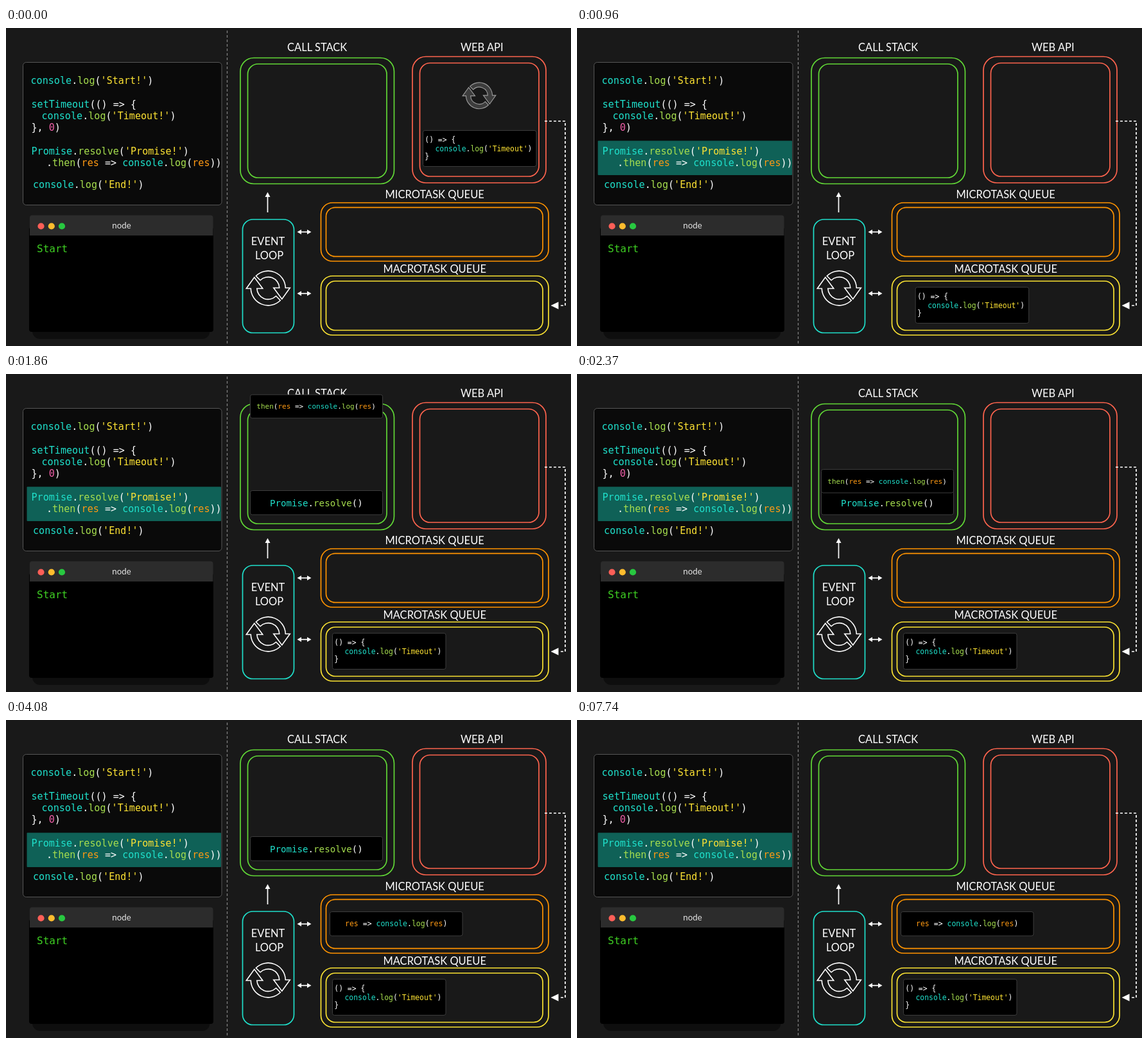
An HTML page for the animation above (7770 ms loop, 880x495 px).

```html
<!DOCTYPE html>
<html lang="en">
<head>
<meta charset="utf-8">
<title>Event loop</title>
<style>
  html, body { margin: 0; width: 100%; height: 100%; overflow: hidden; background: #191919; }
  svg { display: block; width: 880px; height: 495px; }
  .code { font-family: "DejaVu Sans Mono", Menlo, monospace; white-space: pre; fill: #fff; }
  .label { font-family: Lato, Avenir, sans-serif; font-size: 16.5px; fill: #fff; text-anchor: middle; }
  .frame { fill: none; stroke-width: 1.7; }
  .card rect { fill: #000; stroke: #3c3c3c; }
  .line { fill: none; stroke: #fff; stroke-width: 1.7; }
  .head { fill: #fff; }
</style>
</head>
<body>
<svg id="stage" viewBox="0 0 880 495">
  <defs>
    <path id="half" d="M-19 -19 A27 27 0 0 1 27 -.5 H34 L21.5 17 L8.5 -.5 H17.5 A17.5 17.5 0 0 0 -12.3 -12.3 Z"/>
    <g id="cycle"><use href="#half"/><use href="#half" transform="rotate(180)"/></g>
    <g id="both">
      <path class="line" d="M458 0H471"/>
      <path class="head" d="M453.5 0l6.5-3.7v7.4zM475.5 0l-6.5-3.7v7.4z"/>
    </g>
  </defs>
</svg>
<script>
const LOOP = 7770, STEP = 30;
const TEAL = '#1fe0cb', GREEN = '#a6de4e', YELLOW = '#fee333', ORANGE = '#ff9a13', PINK = '#ef5fa7';
const stage = document.getElementById('stage');

function add(tag, attrs, parent = stage, text) {
  const el = document.createElementNS('http://www.w3.org/2000/svg', tag);
  for (const key in attrs) el.setAttribute(key, attrs[key]);
  if (text) el.textContent = text;
  parent.append(el);
  return el;
}

const box = (x, y, right, bottom, rx, attrs, parent) =>
  add('rect', { x, y, width: right - x, height: bottom - y, rx, ...attrs }, parent);

function colorOf(token) {
  if (token[0] === "'") return YELLOW;
  if (/^(console|Promise|setTimeout)$/.test(token)) return TEAL;
  if (/^(log|resolve|then)$/.test(token)) return GREEN;
  if (token === 'res') return ORANGE;
  if (token === '0') return PINK;
  return '#fff';
}

function code(x, y, size, source, parent) {
  const line = add('text', { class: 'code', x, y, 'font-size': size }, parent);
  for (const token of source.match(/'[^']*'|\w+|[^\w']+/g))
    add('tspan', { fill: colorOf(token) }, line, token);
}

function card(width, height, size, lines) {
  const g = add('g', { class: 'card' });
  box(0.5, 0.5, width, height, 3, {}, g);
  for (const [x, y, source] of lines) code(x, y, size, source, g);
  return g;
}

const label = (x, y, text) => add('text', { class: 'label', x, y }, stage, text);

// Left side: script and terminal
add('path', { d: 'M344.5 4V491', stroke: '#7d7d7d', 'stroke-width': 1.3, 'stroke-dasharray': '4 3' });
box(26.5, 53.5, 336, 275.5, 5, { fill: '#0a0a0a', stroke: '#565656' });
const highlight = box(32.5, 175.5, 335, 229, 1, { fill: '#0f6157' });
[
  [38.5, 86.5, "console.log('Start!')"],
  [39.5, 123.7, 'setTimeout(() => {'],
  [55.5, 141.7, "console.log('Timeout!')"],
  [39.5, 159.5, '}, 0)'],
  [39.5, 197, "Promise.resolve('Promise!')"],
  [63, 215, '.then(res => console.log(res))'],
  [42, 249, "console.log('End!')"],
].forEach(([x, y, source]) => code(x, y, 15.1, source));

box(41, 440, 317.5, 484, 12, { fill: '#0e0e0e' });
box(36, 310, 323, 473, 4, { fill: '#000' });
add('path', { d: 'M37 323V295.5Q37 291.5 41 291.5H318.5Q322.5 291.5 322.5 295.5V323Z', fill: '#2c2c2c' });
[[54.5, '#fd5f57'], [70.8, '#fdbc2e'], [87, '#28c840']].forEach(([cx, fill]) =>
  add('circle', { cx, cy: 308.5, r: 5.1, fill }));
add('text', { class: 'label', x: 180, y: 311.5, style: 'font-size:13.3px;fill:#e4e4e4' }, stage, 'node');
add('text', { class: 'code', x: 48, y: 349, 'font-size': 16, style: 'fill:#3fd023' }, stage, 'Start');

// Slides beneath the frames and labels
const callback = card(207, 38, 11.5, [[24, 22.8, 'res => console.log(res)']]);

// Right side: frames, labels and arrows
[
  [365, 46.5, 604.5, 242.5, 21, '#61d836'], [376.5, 56, 593, 233, 16, '#61d836'],
  [633, 44.5, 841, 241, 21, '#ff644e'], [644.5, 54.5, 830, 231, 16, '#ff644e'],
  [490.5, 272, 845, 363, 18, '#ff9300'], [498.5, 279.3, 836, 355.7, 14, '#ff9300'],
  [490.5, 386, 845, 478, 18, '#fae232'], [498.5, 394, 836, 470.5, 14, '#fae232'],
  [368.5, 298, 448.5, 474.5, 16, TEAL],
].forEach(([x, y, right, bottom, r, stroke]) =>
  box(x, y, right, bottom, r, { class: 'frame', stroke }));

label(484.7, 36, 'CALL STACK');
label(741.3, 36, 'WEB API');
label(667.7, 264.7, 'MICROTASK QUEUE');
label(667.7, 381.3, 'MACROTASK QUEUE');
label(408, 338.3, 'EVENT');
label(410, 360, 'LOOP');

add('path', { class: 'line', d: 'M407.5 287V262' });
add('path', { class: 'head', d: 'M407.5 255.5l4 7.5h-8z' });
add('use', { href: '#both', y: 317.5 });
add('use', { href: '#both', y: 413.3 });
add('path', { class: 'line', d: 'M839 145H871V432H861', 'stroke-dasharray': '4 3' });
add('path', { class: 'head', d: 'M848.5 432l12-5.7v11.4z' });
add('use', { href: '#cycle', transform: 'translate(408.3 405)', fill: 'none', stroke: '#fff', 'stroke-width': 1.6 });
const waiting = add('use', {
  href: '#cycle', transform: 'translate(737 105.3) scale(.76)',
  fill: '#3d3d3d', stroke: '#9a9a9a', 'stroke-width': 1.5,
});

const timer = card(177, 56.5, 11.4, [
  [3.3, 18.5, '() => {'],
  [19.5, 32.5, "console.log('Timeout')"],
  [3.3, 45, '}'],
]);
const resolve = card(206.5, 38, 14.15, [[31, 24.5, 'Promise.resolve()']]);
const then = card(206.5, 37, 11, [[10.3, 22.5, 'then(res => console.log(res)']]);

// Route of the timer callback, along the dashed arrow
const route = add('path', {
  d: 'M649 159H760Q784 159 784 183V379Q784 403 760 403H508', fill: 'none',
});
const routeLength = route.getTotalLength();

const part = (t, from, to) => Math.min(1, Math.max(0, (t - from) / (to - from)));
const inOut = p => (1 - Math.cos(Math.PI * p)) / 2;
const outQuad = p => 1 - (1 - p) ** 2;
const inQuad = p => p * p;
const place = (el, x, y) => el.setAttribute('transform', `translate(${x.toFixed(2)} ${y.toFixed(2)})`);
const fade = (el, opacity) => el.setAttribute('opacity', opacity);

function draw(t) {
  const at = route.getPointAtLength(routeLength * inOut(part(t, 180, 1056)));
  place(timer, at.x, at.y);
  fade(waiting, 1 - part(t, 150, 480));
  fade(highlight, part(t, 420, 900));

  place(resolve, 380, 181);
  fade(resolve, part(t, 1130, 1710) * (1 - part(t, 4080, 4650)));

  const drop = outQuad(part(t, 1725, 2370)) - inQuad(part(t, 3480, 3690));
  place(then, 380, -38 + 186 * drop);

  const s = inOut(part(t, 2700, 3500));
  place(callback, 380 + 124 * s, 148 + 150 * s * s);
  fade(callback, t >= 2700 ? 1 : 0);
}

function tick() {
  draw(Math.floor(performance.now() % LOOP / STEP) * STEP);
  requestAnimationFrame(tick);
}
tick();
</script>
</body>
</html>
```
